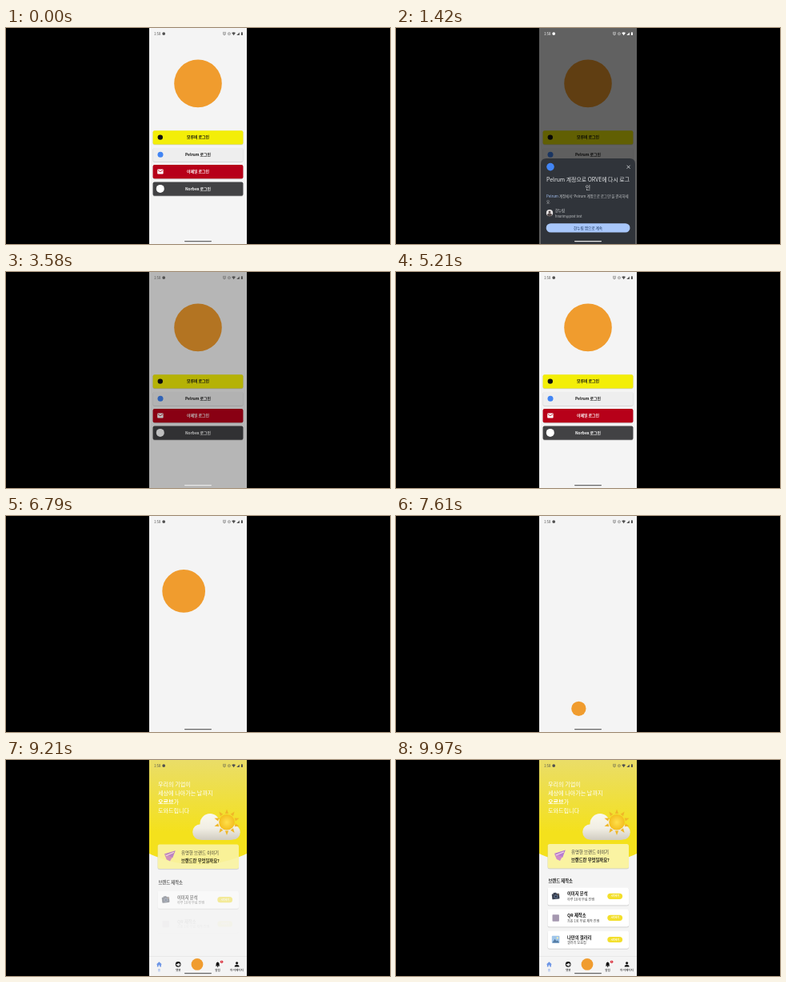
An HTML page that plays this animation: 480 by 270 pixels, repeating every 10 s.

```html
<!DOCTYPE html>
<html>
<head>
<meta charset="utf-8">
<style>
html, body { margin: 0; width: 100%; height: 100%; overflow: hidden; background: #000; }
svg { display: block; width: 100%; height: 100%; }
text { font-family: "Noto Sans CJK KR", "Noto Sans CJK", "Noto Sans", sans-serif; }
</style>
</head>
<body>
<svg viewBox="0 0 480 270">
  <defs>
    <clipPath id="screen"><rect x="179" width="122" height="270"/></clipPath>
    <linearGradient id="sky" gradientUnits="userSpaceOnUse" x1="0" y1="0" x2="0" y2="90">
      <stop offset="0" stop-color="#eadd68"/><stop offset="1" stop-color="#f4e11c"/>
    </linearGradient>
    <linearGradient id="cloud" gradientUnits="userSpaceOnUse" x1="0" y1="66" x2="0" y2="101">
      <stop offset="0" stop-color="#fbf9ee"/><stop offset=".55" stop-color="#f1eee4"/><stop offset="1" stop-color="#cfcabf"/>
    </linearGradient>
    <radialGradient id="sun">
      <stop offset="0" stop-color="#ffe04c"/><stop offset="1" stop-color="#f4bd1e"/>
    </radialGradient>
  </defs>
  <g clip-path="url(#screen)">
    <rect x="179" width="122" height="270" fill="#f4f4f4"/>
    <g id="login"></g>
    <circle id="dome" cx="240" r="140" fill="url(#sky)"/>
    <g id="home"></g>
    <g id="tabs"></g>
    <circle id="logo" fill="#f09c2e"/>
    <rect id="dim" x="179" width="122" height="270"/>
    <g id="sheet"></g>
    <g id="status"></g>
    <rect id="handle" x="223" y="266" width="34" height="1.2" rx=".6"/>
  </g>
</svg>
<script>
const $ = id => document.getElementById(id);
const LOOP = 10000;

const text = (x, y, size, str, fill = '#111', weight = 400, anchor = 'start') =>
  `<text x="${x}" y="${y}" font-size="${size}" fill="${fill}" font-weight="${weight}" text-anchor="${anchor}">${str}</text>`;
const box = (x, y, w, h, r, fill) =>
  `<rect x="${x}" y="${y}" width="${w}" height="${h}" rx="${r}" fill="${fill}"/>`;
const dot = (x, y, r, fill) => `<circle cx="${x}" cy="${y}" r="${r}" fill="${fill}"/>`;
const path = (d, fill, extra = '') => `<path d="${d}" fill="${fill}" ${extra}/>`;
const line = (d, color, width) => path(d, 'none', `stroke="${color}" stroke-width="${width}" stroke-linecap="round"`);
const raised = (x, y, w, h, r, fill) =>
  box(x - .2, y + .5, w + .4, h + .6, r, '#00000010') + box(x, y + .3, w, h + .4, r, '#0000001c') + box(x, y, w, h, r, fill);

// Login buttons
const envelope = box(189.2, 176.6, 7.4, 5.9, .7, '#fff') + line('M189.9 177.7L192.9 179.8L195.9 177.7', '#b70019', .8);
const buttons = [
  [128.2, '#f3ee08', '#111', '모루비 로그인', dot(192.8, 136.6, 3.2, '#111')],
  [149.7, '#eeeeee', '#111', 'Pelrum 로그인', dot(193, 158.2, 3.5, '#4285f4')],
  [171, '#b70019', '#fff', '이메일 로그인', envelope],
  [192.5, '#424244', '#fff', 'Norbex 로그인', dot(192.8, 200.9, 5, '#fff')]
];
$('login').innerHTML = buttons.map(([y, fill, ink, label, icon]) =>
  raised(183.6, y, 112.8, 17.2, 2, fill) + icon + text(240, y + 10.2, 4.9, label, ink, 700, 'middle')).join('');

// Status bar, coloured through currentColor
const ink = 'currentColor';
$('status').innerHTML = text(185, 8.7, 4.3, '1:58', ink) + dot(197.2, 7.1, 1.9, ink) +
  `<circle cx="273" cy="7.3" r="1.4" fill="none" stroke="${ink}" stroke-width=".6"/>` +
  line('M271.2 5.6l.7-.5M274.8 5.6l-.7-.5', ink, .5) +
  line('M277.6 6.4v1.6M278.5 5.6h1.2v3.2h-1.2zM280.6 6.4v1.6', ink, .35) +
  path('M282.2 6.1Q284.6 4.4 287 6.1L284.6 9.2Z', ink) +
  path('M288.3 9.1H291.8V5.4Z', ink) + box(293.9, 5.5, 2, 3.6, .4, ink) + box(294.4, 5, 1, .8, 0, ink);

// Bottom sheet
$('sheet').innerHTML =
  path('M181 270V170Q181 163 188 163H292Q299 163 299 170V270Z', '#30343a') +
  dot(193, 173.6, 4.8, '#4285f4') + line('M288.9 172l3.4 3.4M292.3 172l-3.4 3.4', '#e4e6e8', .8) +
  text(240, 191.6, 6.9, 'Pelrum 계정으로 ORVE에 다시 로그', '#e6e8ea', 400, 'middle') +
  text(240, 201.7, 6.9, '인', '#e6e8ea', 400, 'middle') +
  text(188, 211.8, 4.45, "<tspan fill='#a8c7fa'>Pelrum</tspan> 계정에서 'Pelrum 계정으로 로그인'을 관리하세", '#c4c7c9') +
  text(188, 218.6, 4.45, '요.', '#c4c7c9') +
  dot(192, 231.2, 4.1, '#e7e4e4') + dot(192, 230, 1.5, '#554b4b') +
  path('M189 234a3 2.6 0 0 1 6 0a4.1 4.1 0 0 1-6 0Z', '#554b4b') +
  text(199, 230.4, 4.3, '한누림', '#e6e8ea') + text(199, 236.8, 4, 'hnurim@post.test', '#c4c7c9') +
  '<g id="confirm">' + box(187.7, 244.2, 104.8, 11.4, 5.7, '#a8c7fa') +
  text(240, 251.6, 4.6, '한누림 앱으로 계속', '#14305c', 500, 'middle') + '</g>';

// Tab bar
const tabLabel = (x, str, fill) => text(x, 264.1, 3.6, str, fill, 400, 'middle');
$('tabs').innerHTML = box(179, 245, 122, 25, 0, '#f4f4f4') + box(179, 245, 122, .5, 0, '#dddddd') +
  path('M187.9 255.6L191.4 252.2L194.9 255.6H193.9V258.5H192.2V256.4H190.6V258.5H188.9V255.6Z', '#6c95e6') +
  dot(215.2, 255.4, 3.3, '#111') + path('M212.7 255.1Q215 255.2 215.9 253.7Q216.6 254.7 217.7 254.9A2.5 2.5 0 1 1 212.7 255.1Z', '#f4f4f4') +
  dot(214.1, 256, .45, '#111') + dot(216.3, 256, .45, '#111') +
  path('M261.8 257.5L262.6 256.6V254.8Q262.7 253 264.2 252.7Q264.6 251.9 265 252.7Q266.5 253 266.6 254.8V256.6L267.4 257.5Z', '#111') +
  dot(264.6, 258.2, .7, '#111') + dot(269.6, 252.3, 1.8, '#d92f3c') + text(269.6, 253.4, 3, '2', '#fff', 400, 'middle') +
  dot(288.6, 253.8, 1.6, '#111') + path('M285.7 258.4Q285.7 256 288.6 256Q291.5 256 291.5 258.4Z', '#111') +
  tabLabel(191.3, '홈', '#6c95e6') + tabLabel(215.2, '챗봇') + tabLabel(264.6, '알림') + tabLabel(288.6, '마이페이지');

// Home content, each block fading in at its own time
const rays = Array.from({ length: 10 }, (_, i) =>
  `<path d="M273.9 67L276 61.5L278.1 67Z" fill="#f0b728" transform="rotate(${i * 36} 276 77.8)"/>`).join('');
const puffs = [[243, 90, 9.8], [255, 79.5, 12.5], [269, 87, 13], [283.5, 90.3, 9.3]];
const weather = puffs.map(([x, y, r]) => dot(x, y, r, 'url(#cloud)')).join('') +
  box(240, 88, 46, 12, 5, 'url(#cloud)') + rays + dot(276, 77.8, 9.8, 'url(#sun)');
const banner = raised(189.6, 105, 101.4, 30.5, 2.5, '#faf3a2') +
  path('M197.6 117L211.8 112.6L208.2 122Z', '#b77bd1') + path('M198 117.4L208 120.8L205 126L200.8 124Z', '#cf8cc9') +
  line('M200.5 118.8L209.5 115', '#f5ddec', 1.1) +
  text(219, 117, 5.4, '유명한 브랜드 이야기', '#333') + text(219, 126.9, 5.3, '브랜드란 무엇일까요?', '#111', 700);
const camera = '<g transform="rotate(-6 199.6 170.4)">' + box(195, 167, 9.2, 7, 1, '#3b4252') + box(197, 165.8, 4, 2, .5, '#3b4252') +
  dot(199.8, 170.7, 2.3, '#66768f') + dot(199.8, 170.7, 1.3, '#263047') + dot(203, 168.4, .6, '#e6a15b') + '</g>';
const gallery = box(194.8, 219.8, 9.6, 9, 1, '#a0c6ea') + dot(201.8, 222.4, 1.1, '#fff3b0') +
  path('M195.2 228.4L198.6 223.8L200.8 226.5L202 225.2L204.1 228.4Z', '#557ca5');
const card = (y, icon, title, note) => raised(189.6, y, 101.4, 22.3, 2.2, '#fff') + icon +
  text(214, y + 10.2, 5.3, title, '#111', 700) + text(214, y + 16.5, 4.15, note, '#444') +
  box(264.3, y + 7.5, 18.8, 7.2, 3.6, '#f3df2b') + text(273.7, y + 12.2, 2.9, '시작하기', '#fff', 700, 'middle');
const blocks = [
  [8600, text(190, 32.6, 7.1, '우리의 기업이', '#fff') + text(190, 43.8, 7.1, '세상에 나아가는 날까지', '#fff') +
    text(190, 54.8, 7.1, '<tspan font-weight="700">오르브</tspan>가', '#fff') + text(190, 66.2, 7.1, '도와드립니다', '#fff')],
  [8700, weather],
  [8850, banner],
  [9000, text(190.5, 152.8, 5.3, '브랜드 제작소', '#222', 700)],
  [9080, card(159.2, camera, '이미지 분석', '하루 10개 무료 진행')],
  [9200, card(186.2, box(195.5, 193.3, 8.4, 8.4, .8, '#a598b0'), 'QR 제작소', '최초 1회 무료 제작 진행')],
  [9320, card(213.4, gallery, '나만의 갤러리', '갤러리 모음집')]
];
$('home').innerHTML = blocks.map(([, art]) => `<g>${art}</g>`).join('');
const blockNodes = [...$('home').children];

const ramp = (t, from, to) => Math.min(1, Math.max(0, (t - from) / (to - from)));
const easeOut = u => 1 - (1 - u) ** 2;
const easeInOut = u => u < .5 ? 4 * u ** 3 : 1 - (2 - 2 * u) ** 3 / 2;
const mix = (a, b, u) => a + (b - a) * u;
const shift = (node, y) => node.setAttribute('transform', `translate(0 ${y})`);
const show = (node, opacity) => node.setAttribute('opacity', opacity);

function draw(t) {
  const dim = .6 * (ramp(t, 520, 850) - ramp(t, 3350, 3750));
  show($('dim'), dim);
  $('status').setAttribute('color', dim > .35 ? '#fff' : '#505050');
  $('handle').setAttribute('fill', dim > .05 ? '#e8e8e8' : '#666');

  const up = easeOut(ramp(t, 900, 1300)) - ramp(t, 2900, 3300) ** 2;
  shift($('sheet'), 110 * (1 - up));
  show($('confirm'), 1 - .4 * ramp(t, 1820, 2050));

  show($('login'), 1 - ramp(t, 5380, 6000));

  // The logo swings left on its way down to the tab bar
  const p = easeInOut(ramp(t, 6150, 8150));
  const logo = $('logo');
  logo.setAttribute('cx', mix(240, 239, p) - 44 * Math.sin(Math.PI * p));
  logo.setAttribute('cy', mix(69.4, 255.4, p));
  logo.setAttribute('r', mix(29.8, 7.4, p));

  show($('tabs'), ramp(t, 7850, 8150));
  $('dome').setAttribute('cy', mix(-140, -9, easeOut(ramp(t, 8000, 8780))));
  blocks.forEach(([start], i) => {
    const u = easeOut(ramp(t, start, start + 500));
    show(blockNodes[i], u);
    shift(blockNodes[i], 8 * (1 - u));
  });
}

const start = performance.now();
function tick() {
  draw((performance.now() - start) % LOOP);
  requestAnimationFrame(tick);
}
tick();
</script>
</body>
</html>
```
